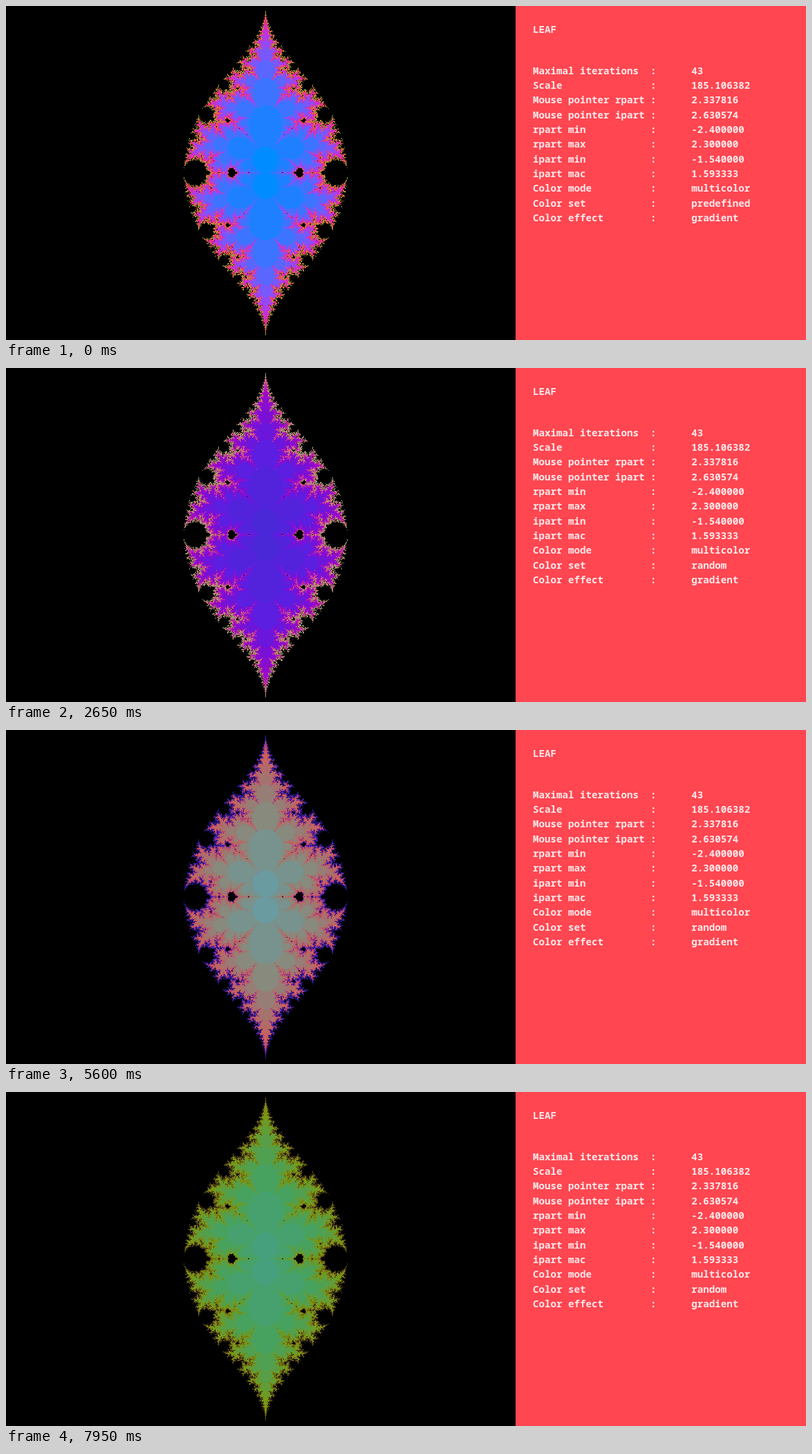
An HTML page with a canvas for the animation above (8 s loop, 1157x484 px).

```html
<!DOCTYPE html>
<html lang="en">
<head>
<meta charset="utf-8">
<title>Leaf</title>
<style>
html, body { margin: 0; width: 100%; height: 100%; overflow: hidden; background: #000; }
canvas { position: absolute; left: 253px; top: 3px; }
#panel { position: absolute; left: 737px; top: 0; width: 420px; height: 484px; background: #ff4651; }
pre {
  position: absolute; left: 25px; margin: 0; color: #ffe9ea;
  font: 600 14.17px/21.35px "Noto Sans Mono", "DejaVu Sans Mono", monospace;
}
</style>
</head>
<body>
<canvas id="leaf" width="244" height="476"></canvas>
<div id="panel">
  <pre style="top:23px">LEAF</pre>
  <pre id="info" style="top:82.5px"></pre>
</div>
<script>
const LOOP = 8000, MAX_ITER = 43, LIMIT = 1000;
const LEFT = 253, TOP = 3, CENTER_X = 375, CENTER_Y = 241.2, SCALE = 156.8;

// Each palette starts at its time; its colours sit at these iteration depths.
const DEPTHS = [0, 2, 4, 7, 11, 17, 41];
const PALETTES = [
  [0, '008cff 3c74ff 7858ff c82edc f02878 e6783c 4cb43c'],
  [1300, '3e84da 626edc 8c5ce0 cc3cdc e04696 dc9a78 50b464'],
  [2650, '4a28d8 5c1ee0 7a10d6 a006c8 d23c96 c88c6e 64aa78'],
  [3950, '5f3c14 52480f 48550e 3c6c14 559146 82aa8c 786eaa'],
  [5000, '699ba0 878a7d a5736e cd5f5a b43c78 371ebe 141450'],
  [5950, '3420cd 322eaa 323c8c 325569 50735f a59678 be6e8c'],
  [7200, '46a07d 48a25f 589e46 739b19 828c0f 6e5f14 281e28'],
].map(([start, list]) => ({ start, ramp: makeRamp(list.split(' ')) }));

function makeRamp(hexes) {
  const stops = hexes.map(h => [0, 2, 4].map(i => parseInt(h.slice(i, i + 2), 16)));
  return Array.from({ length: MAX_ITER }, (_, k) => {
    let i = 0;
    while (i < DEPTHS.length - 2 && k > DEPTHS[i + 1]) i++;
    const t = (k - DEPTHS[i]) / (DEPTHS[i + 1] - DEPTHS[i]);
    return stops[i].map((v, j) => v + (stops[i + 1][j] - v) * t);
  });
}

// Escape depth of z -> cos(z / c) from z = 0, or -1 when it stays bounded.
function escapeDepth(cx, cy) {
  const norm = cx * cx + cy * cy;
  let x = 1, y = 0;
  for (let n = 2; n < MAX_ITER; n++) {
    const a = (x * cx + y * cy) / norm, b = (y * cx - x * cy) / norm;
    const grow = Math.exp(b), shrink = 1 / grow;
    x = Math.cos(a) * (grow + shrink) / 2;
    y = -Math.sin(a) * (grow - shrink) / 2;
    if (!(x * x + y * y <= LIMIT)) return n - 2;
  }
  return -1;
}

const canvas = document.getElementById('leaf');
const ctx = canvas.getContext('2d');
const { width, height } = canvas;
const depth = new Int8Array(width * height);
for (let i = 0; i < depth.length; i++) {
  const px = LEFT + i % width, py = TOP + Math.floor(i / width);
  depth[i] = escapeDepth((px - CENTER_X) / SCALE, (py - CENTER_Y) / SCALE);
}

const image = ctx.createImageData(width, height);
function paint(ramp) {
  depth.forEach((k, i) => {
    image.data.set(k < 0 ? [0, 0, 0, 255] : [...ramp[k], 255], i * 4);
  });
  ctx.putImageData(image, 0, 0);
}

function showInfo(colorSet) {
  const rows = [
    ['Maximal iterations', '43'],
    ['Scale', '185.106382'],
    ['Mouse pointer rpart', '2.337816'],
    ['Mouse pointer ipart', '2.630574'],
    ['rpart min', '-2.400000'],
    ['rpart max', '2.300000'],
    ['ipart min', '-1.540000'],
    ['ipart mac', '1.593333'],
    ['Color mode', 'multicolor'],
    ['Color set', colorSet],
    ['Color effect', 'gradient'],
  ];
  document.getElementById('info').textContent =
    rows.map(([label, value]) => label.padEnd(20) + ':'.padEnd(7) + value).join('\n');
}

let current = -1;
function frame(now) {
  const time = now % LOOP;
  const index = PALETTES.findLastIndex(p => p.start <= time);
  if (index !== current) {
    current = index;
    paint(PALETTES[index].ramp);
    showInfo(index ? 'random' : 'predefined');
  }
  requestAnimationFrame(() => frame(performance.now()));
}
frame(performance.now());
</script>
</body>
</html>
```
